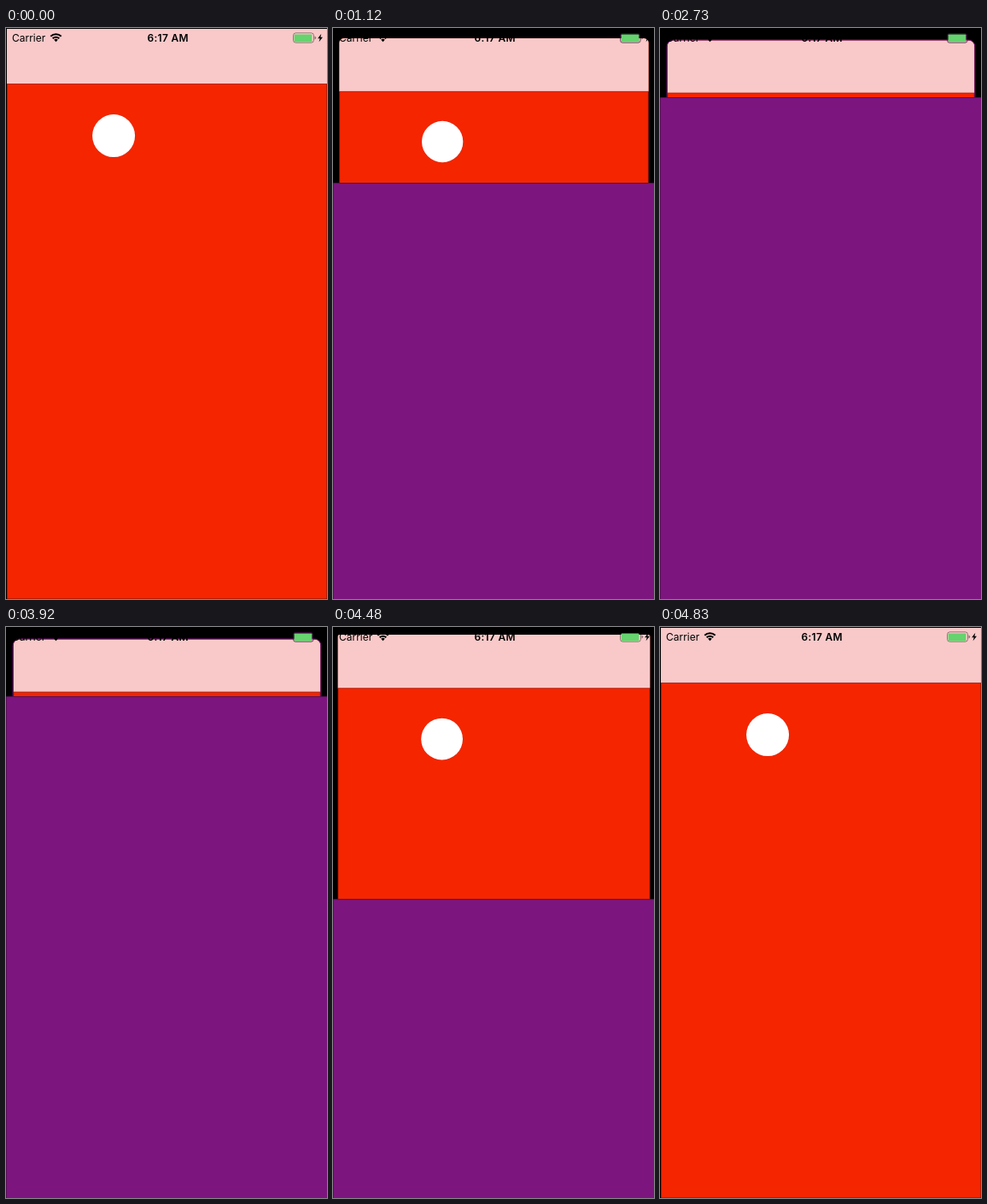
Recreate the animation shown at these times as an HTML page. Size 376 by 668 pixels, loop 8000 ms.

```html
<!DOCTYPE html>
<html lang="en">
<head>
<meta charset="utf-8">
<title>Sheet over a card</title>
<style>
  html, body { margin: 0; width: 100%; height: 100%; overflow: hidden; background: #000; }
  svg { display: block; width: 376px; height: 668px; }
  text { font: 12px Inter, Roboto, sans-serif; }
  .time { font-weight: 600; letter-spacing: .3px; }
</style>
</head>
<body>
<svg viewBox="0 0 376 668">
  <defs>
    <clipPath id="round"><rect id="corners" x="1" y="1" width="375" height="667"/></clipPath>
  </defs>
  <rect width="376" height="668" fill="#000"/>

  <g id="card">
    <g clip-path="url(#round)">
      <rect x="1" y="1" width="375" height="667" fill="#f52500"/>
      <path d="M1.5 65V668M375.5 65V668M1 667.5H376" stroke="#000" stroke-opacity=".25"/>
      <rect x="1" y="1" width="375" height="64" fill="#f9c9c9"/>
      <path d="M1 65.5H376" stroke="#b02a1c"/>
      <circle cx="126.1" cy="126.1" r="25.4" fill="#b81c00" fill-opacity=".35"/>
      <circle cx="126.1" cy="126.1" r="25" fill="#fff"/>
    </g>
    <rect id="edge" x=".6" y=".6" width="375.8" height="667.8" rx="8" fill="none" stroke="#7d157f"/>
  </g>
  <path d="M0 .5H376M.5 0V668" stroke="#000" stroke-opacity=".85"/>

  <g id="sheet">
    <rect width="376" height="668" fill="#7d157f"/>
    <path d="M0 .5H376M.5 0V668" stroke="#000" stroke-opacity=".3"/>
  </g>

  <g id="status">
    <text x="7" y="16">Carrier</text>
    <g fill="none" stroke="#000" stroke-width="2">
      <path d="M52.3 9.8A8.8 8.8 0 0 1 64.7 9.8"/>
      <path d="M54.7 12.2A5.4 5.4 0 0 1 62.3 12.2"/>
    </g>
    <path d="M58.5 16.2L56.2 13.8A3.3 3.3 0 0 1 60.8 13.8Z"/>
    <text class="time" x="189.7" y="16" text-anchor="middle">6:17 AM</text>
    <rect x="336.5" y="5.8" width="24" height="11.4" rx="3" fill="none" stroke="#000" stroke-opacity=".4"/>
    <rect id="cell" x="336.9" y="6.7" width="22.2" height="10.4" rx="1.6" fill="none" stroke="#7d157f"/>
    <rect x="337.6" y="7.4" width="20.8" height="9" rx=".8" fill="#65d36e"/>
    <path d="M361.5 9.6Q363.2 10.2 363.2 11.6T361.5 13.6Z" fill-opacity=".45"/>
    <path d="M369.3 6.8L365.2 12.2H367.7L366.6 16.2L371 10.8H368.4Z"/>
  </g>
</svg>
<script>
const LOOP = 8000, STEP = 70;
const OPEN = 980, SETTLED = 1680, DRAG = 3920, RELEASE = 4480, CLOSED = 4830;
const PULL = 0.404, POWER = 1.6;
const $ = id => document.getElementById(id);

// Critically damped spring towards zero; t in seconds.
const spring = (x, v, w, t) => (x + (v + w * x) * t) * Math.exp(-w * t);

function progress(ms) {
  if (ms < OPEN || ms >= CLOSED) return 0;
  if (ms < DRAG) return ms >= SETTLED ? 1 : 1 - spring(1, 0, 22.9, (ms - OPEN) / 1000);
  const length = RELEASE - DRAG;
  if (ms <= RELEASE) return 1 - PULL * ((ms - DRAG) / length) ** POWER;
  const speed = PULL * POWER / (length / 1000);
  return spring(1 - PULL, -speed, 20, (ms - RELEASE) / 1000);
}

function draw(p) {
  const scale = 1 - 0.04 * p;
  $("card").setAttribute("transform",
    `translate(188.5 334.5) scale(${scale}) translate(-188.5 -334.5)`);
  $("corners").setAttribute("rx", 8 * p * p);
  $("edge").setAttribute("opacity", p > 0.97 ? 1 : 0);
  $("cell").setAttribute("opacity", p > 0.7 ? 0.6 * p : 0);
  $("sheet").setAttribute("transform", `translate(0 ${668 - 587 * p})`);
  $("sheet").setAttribute("visibility", p > 0 ? "visible" : "hidden");
}

const start = performance.now();
function tick() {
  const ms = (performance.now() - start) % LOOP;
  draw(progress(Math.floor(ms / STEP) * STEP));
  requestAnimationFrame(tick);
}
tick();
</script>
</body>
</html>
```
